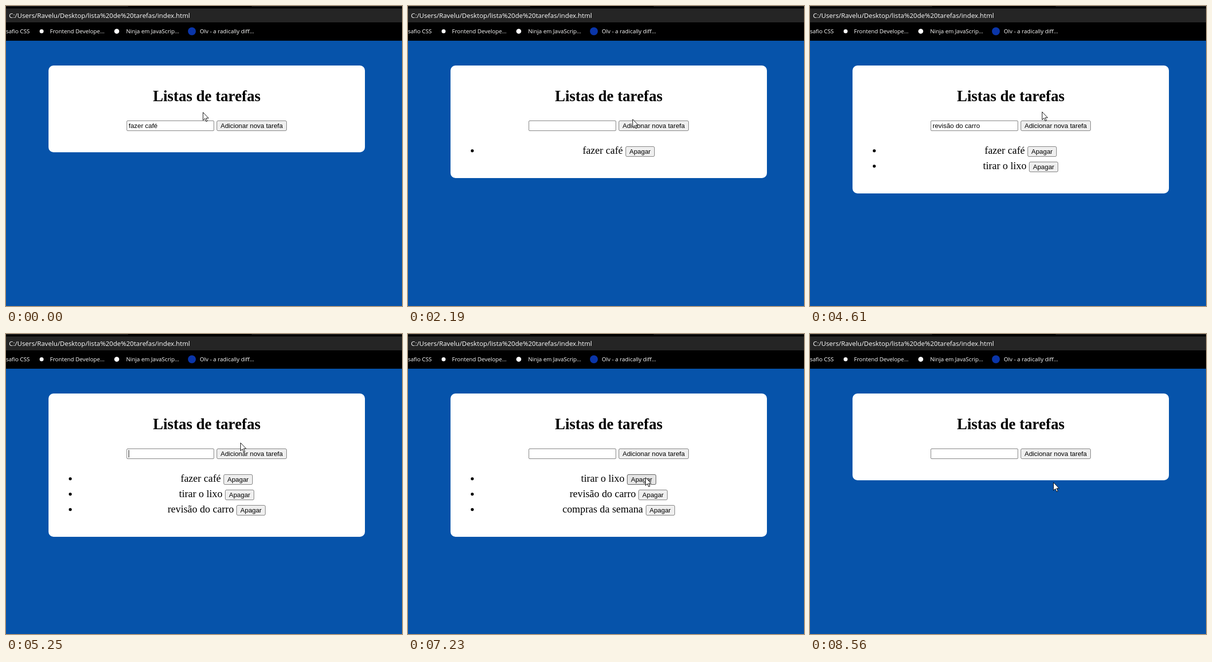
These frames come from a looping animation (801x605 px, 8.75 s). An HTML page:

```html
<!DOCTYPE html>
<html lang="pt-BR">
<head>
<meta charset="utf-8">
<title>Listas de tarefas</title>
<style>
  html, body { margin: 0; width: 100%; height: 100%; overflow: hidden; background: #0653aa; }
  #stage { position: relative; width: 801px; height: 605px; overflow: hidden;
    font: 20.8px/31.2px "Liberation Serif", "Times New Roman", serif; color: #000; }
  #stage > * { position: absolute; }
  .browser { left: 0; top: 0; width: 801px; height: 70px; background: #000; color: #fff;
    font: 11.4px/20px "Open Sans", "Noto Sans", sans-serif; white-space: pre; }
  .browser > * { position: absolute; }
  .tab { top: 0; height: 1px; background: #333; }
  .address { left: 0; top: 5px; width: 795px; height: 28px; padding-left: 6px;
    background: #252525; font-size: 13.3px; line-height: 28px; }
  .mark { top: 41px; }
  .dot { border-radius: 50%; background: #fff; }
  .card { left: 86px; top: 120px; width: 640px; border-radius: 10px; background: #fff; }
  h1 { left: 86px; top: 162px; width: 640px; margin: 0; text-align: center;
    font-size: 31.2px; line-height: 40px; }
  .field, .btn { box-sizing: border-box; height: 21px; border: 1px solid #767676;
    font: 13.333px/15px "Liberation Sans", Arial, sans-serif; white-space: pre; }
  .field { left: 244px; top: 231px; width: 177px; padding: 2px 3px; border-radius: 2px; background: #fff; }
  .caret { display: inline-block; width: 1px; height: 15px; margin-right: -1px;
    vertical-align: top; background: #000; }
  .btn { display: inline-block; padding: 2px 0; border-radius: 3px; background: #efefef;
    text-align: center; }
  .btn.hover { background: #e5e5e5; border-color: #4f4f4f; }
  .btn.active { background: #f5f5f5; border-color: #8d8d8d; }
  #add { left: 426px; top: 231px; width: 142px; }
  .row { left: 146px; width: 560px; height: 31px; text-align: center; white-space: pre; }
  .row::before { content: ""; position: absolute; left: -19px; top: 13.5px; width: 6px; height: 6px;
    border-radius: 50%; background: #000; }
  .row .btn { width: 59px; }
  #click { left: 0; top: 0; width: 24px; height: 24px; margin: -12px; border-radius: 50%;
    background: rgba(252, 238, 0, .65); }
  #cursor { left: 0; top: 0; width: 14px; height: 21px; }
</style>
</head>
<body>
<div id="stage">
  <div class="browser">
    <i class="tab" style="left:0;width:247px"></i>
    <i class="tab" style="left:497px;width:304px"></i>
    <div class="address">C:/Users/Ravelu/Desktop/lista%20de%20tarefas/index.html</div>
    <span class="mark" style="left:0">safio CSS</span>
    <i class="dot" style="left:68px;top:47px;width:8px;height:8px"></i>
    <span class="mark" style="left:89px">Frontend Develope...</span>
    <i class="dot" style="left:219px;top:46px;width:10px;height:10px"></i>
    <span class="mark" style="left:243px">Ninja em JavaScrip...</span>
    <i class="dot" style="left:368px;top:43px;width:16px;height:16px;background:#0a35a8"></i>
    <span class="mark" style="left:392px">Olv - a radically diff...</span>
  </div>
  <div class="card" id="card"></div>
  <h1>Listas de tarefas</h1>
  <div class="field"><span id="typed"></span><i class="caret" id="caret"></i></div>
  <div class="btn" id="add">Adicionar nova tarefa</div>
  <div id="click"></div>
  <svg id="cursor" viewBox="0 0 14 21">
    <path d="M.5.5V16.5L4.2 13 6.8 19 9.3 18 6.7 12.2H11.7Z" fill="#fff" stroke="#000"/>
  </svg>
</div>
<script>
  const LOOP = 8750;
  const HOLD = 75;           // a click lasts this long, then takes effect
  const TYPING = 720;        // from an added task to the next text in the field
  const FIRST_FOCUS = 70;
  const BLINK = 460;
  const GLIDE = 500;
  const REST_Y = 213;
  const tasks = ['fazer café', 'tirar o lixo', 'revisão do carro', 'compras da semana'];

  // "lead" is how long before a click the pointer sets out for it.
  const adds = [
    { at: 1450, lead: 1160, x: 457, y: 240 },
    { at: 3470, lead: 720, x: 450, y: 237 },
    { at: 4980, lead: 300, x: 469, y: 238 },
    { at: 6390, lead: 810, x: 476, y: 237 }
  ];
  const first = { x: 480, y: 289 }, last = { x: 490, y: 295 };
  const deletes = [
    { at: 7150, lead: 300, ...first },
    { at: 7550, lead: 100, ...first },
    { at: 8080, lead: 400, ...last },
    { at: 8290, lead: 100, ...last }
  ];
  const clicks = [...adds, ...deletes];
  const home = { x: 398, y: 214 };
  const exit = { at: 8700, lead: 270, x: 492, y: 299 };

  // After each added task the pointer rests above the form before the next click.
  const glides = [...clicks, exit].flatMap((stop, i) => {
    const start = stop.at - stop.lead;
    const trip = { start, time: stop.lead * 0.6, x: stop.x, y: stop.y };
    if (i < 1 || i > adds.length) return [trip];
    const leave = Math.max(clicks[i - 1].at + HOLD, start - 650);
    const rest = { start: leave, time: Math.min(GLIDE, start - leave), x: stop.x, y: REST_Y };
    return [rest, trip];
  });

  const get = id => document.getElementById(id);
  const [stage, card, typed, caret, add, press, cursor] =
    ['stage', 'card', 'typed', 'caret', 'add', 'click', 'cursor'].map(get);

  const rows = tasks.map((_, i) => {
    const row = document.createElement('div');
    row.className = 'row';
    row.style.top = 275.4 + 31 * i + 'px';
    row.innerHTML = '<span></span> <span class="btn">Apagar</span>';
    stage.insertBefore(row, press);
    return row;
  });
  const buttons = [add, ...rows.map(row => row.lastChild)];

  const easeOut = p => 1 - (1 - p) ** 3;
  const finished = (list, t) => list.filter(click => t >= click.at + HOLD).length;
  const show = (el, on) => { el.style.display = on ? '' : 'none'; };
  const place = (el, x, y) => { el.style.transform = `translate(${x}px, ${y}px)`; };

  function pointer(t) {
    let { x, y } = home;
    for (const glide of glides) {
      if (t < glide.start) break;
      const done = easeOut(Math.min(1, (t - glide.start) / glide.time));
      x += (glide.x - x) * done;
      y += (glide.y - y) * done;
    }
    return [Math.round(x), Math.round(y)];
  }

  function drawField(t, added) {
    const focus = added ? adds[added - 1].at + HOLD : FIRST_FOCUS;
    const filled = added < tasks.length && (!added || t >= focus + TYPING);
    const lit = t >= focus && (t - focus) % (2 * BLINK) < BLINK;
    typed.textContent = filled ? tasks[added] : '';
    show(caret, lit && (!added || !filled) && t < deletes[0].at);
  }

  function drawList(list) {
    rows.forEach((row, i) => {
      show(row, i < list.length);
      row.firstChild.textContent = list[i] || '';
    });
    card.style.height = (list.length ? 195.8 + 31.2 * list.length : 175) + 'px';
  }

  function draw() {
    const t = performance.now() % LOOP;
    const added = finished(adds, t);
    drawField(t, added);
    drawList(tasks.slice(finished(deletes, t), added));

    const [x, y] = pointer(t);
    const pressed = clicks.some(click => t >= click.at && t < click.at + HOLD);
    show(press, pressed);
    place(press, x, y);
    place(cursor, x, y);
    for (const button of buttons) {
      const box = button.getBoundingClientRect();
      const over = x >= box.left && x < box.right && y >= box.top && y < box.bottom;
      button.classList.toggle('hover', over && !pressed);
      button.classList.toggle('active', over && pressed);
    }
    requestAnimationFrame(draw);
  }
  draw();
</script>
</body>
</html>
```
